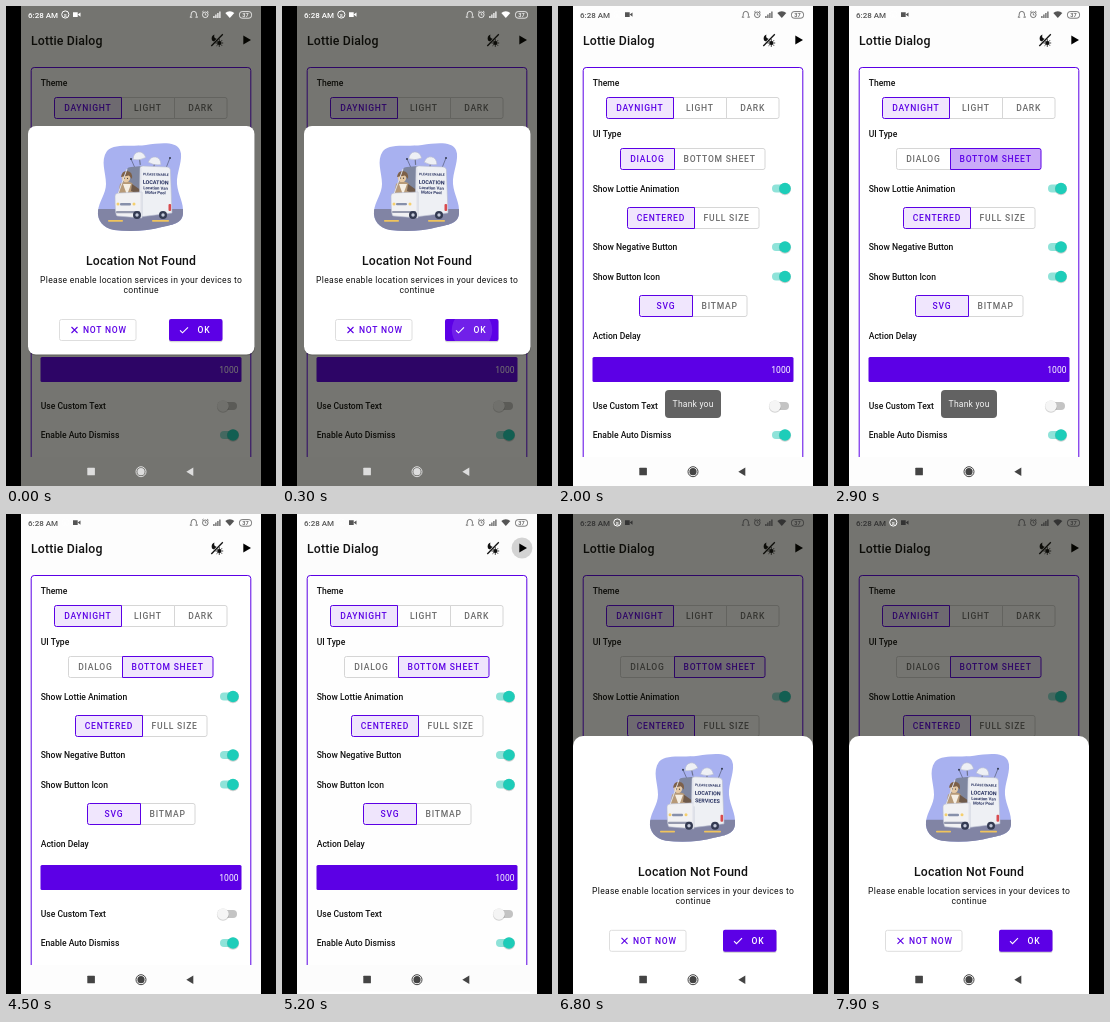
An HTML page with a canvas that plays this animation: 270x480 px, repeating every 8 s.

```html
<!DOCTYPE html>
<html lang="en">
<head>
<meta charset="utf-8">
<title>Lottie Dialog</title>
<style>
html, body { margin: 0; width: 100%; height: 100%; overflow: hidden; background: #000; }
canvas { display: block; width: 270px; height: 480px; }
</style>
</head>
<body>
<canvas id="stage"></canvas>
<script>
const LOOP = 8000;
const PURPLE = '#5c00e6', TINT = '#f0e6fd', TEAL = '#1dcdb9';
const canvas = document.getElementById('stage');
const g = canvas.getContext('2d');
const ratio = window.devicePixelRatio || 1;
canvas.width = 270 * ratio;
canvas.height = 480 * ratio;

const ramp = (t, a, b) => Math.min(1, Math.max(0, (t - a) / (b - a)));
const easeOut = p => 1 - (1 - p) ** 3;
// Rises from a to b, holds, falls from c to d.
const pulse = (t, a, b, c, d) => ramp(t, a, b) * (1 - ramp(t, c, d));

function paint(fill, stroke, line) {
  if (fill) { g.fillStyle = fill; g.fill(); }
  if (stroke) { g.strokeStyle = stroke; g.lineWidth = line; g.stroke(); }
}

function box(x, y, w, h, r, fill, stroke, line = 1) {
  g.beginPath();
  g.roundRect(x, y, w, h, r);
  paint(fill, stroke, line);
}

function disc(x, y, r, fill, stroke, line = 1) {
  g.beginPath();
  g.arc(x, y, r, 0, 7);
  paint(fill, stroke, line);
}

function shape(path, fill, stroke, line = 1) {
  const p = new Path2D(path);
  if (fill) { g.fillStyle = fill; g.fill(p); }
  if (stroke) { g.strokeStyle = stroke; g.lineWidth = line; g.stroke(p); }
}

function text(str, x, y, { size = 8.56, weight = 500, color = '#111', align = 'left', spacing = 0 } = {}) {
  g.font = `${weight} ${size}px Roboto, sans-serif`;
  g.letterSpacing = spacing + 'px';
  g.textAlign = align;
  g.fillStyle = color;
  g.fillText(str, x + (align === 'center' ? spacing / 2 : 0), y);
}

function faded(alpha, draw) {
  if (alpha <= 0) return;
  g.save();
  g.globalAlpha *= alpha;
  draw();
  g.restore();
}

function clipped(x, y, w, h, r, draw) {
  g.save();
  g.beginPath();
  g.roundRect(x, y, w, h, r);
  g.clip();
  draw();
  g.restore();
}

// edges lists the left side of each button plus the right end of the group.
function group(y, edges, labels, selected) {
  const cell = i => {
    const on = i === selected, x = edges[i], w = edges[i + 1] - x;
    const first = i === 0, last = i === labels.length - 1;
    const r = [first ? 2 : 0, last ? 2 : 0, last ? 2 : 0, first ? 2 : 0];
    box(x + .5, y + .5, w, 21, r, on ? TINT : null, on ? PURPLE : '#d6d6d6');
    text(labels[i], x + w / 2, y + 14.2,
      { color: on ? PURPLE : '#6c6c6c', align: 'center', spacing: .76 });
  };
  labels.forEach((_, i) => i !== selected && cell(i));
  cell(selected);
}

function toggle(y, on) {
  box(214, y - 4, 17, 8, 4, on ? '#8fe3d9' : '#c4c4c4');
  const x = on ? 227 : 217;
  disc(x, y + .6, 6.1, 'rgba(0,0,0,.18)');
  disc(x, y, 5.8, on ? TEAL : '#f5f5f5');
}

function dayNightIcon() {
  shape('M205.3 40L216.8 28.2', null, '#111', 1.3);
  shape('M208.4 28.6Q204.6 30.4 206 34.4L208 35.4L210.6 32.8Q207.4 32.4 208.4 28.6Z', '#111');
  disc(213.3, 37, 1.9, '#111');
  for (let i = 0; i < 8; i++) {
    const a = i * Math.PI / 4;
    shape(`M213.3 37l${Math.cos(a) * 3.9} ${Math.sin(a) * 3.9}`, null, '#111', .8);
  }
}

function page(t) {
  box(15, 0, 240, 480, 0, '#fdfdfd');
  text('Lottie Dialog', 25, 38.6, { size: 12.3, spacing: .15 });
  dayNightIcon();
  faded(.16 * pulse(t, 5000, 5100, 5250, 5500), () =>
    disc(240, 34, 4 + 8 * ramp(t, 5000, 5250), '#000'));
  shape('M237.3 29.4L245 34L237.3 38.6Z', '#000');

  clipped(15, 50, 240, 401, 0, () => box(25.2, 61.5, 219.6, 420, 3, '#fff', PURPLE, 1));
  const labels = {
    80: 'Theme', 131: 'UI Type', 185.5: 'Show Lottie Animation', 244: 'Show Negative Button',
    273.5: 'Show Button Icon', 333: 'Action Delay', 403: 'Use Custom Text', 432.2: 'Enable Auto Dismiss'
  };
  for (const y in labels) text(labels[y], 34.7, +y);

  group(91, [48, 115, 168, 220.5], ['DAYNIGHT', 'LIGHT', 'DARK'], 0);
  group(142, [62, 116, 206.5], ['DIALOG', 'BOTTOM SHEET'], t < 2650 ? 0 : 1);
  faded(.26 * pulse(t, 2500, 2600, 3000, 3350), () =>
    clipped(116, 142, 91, 22, 2, () => disc(170, 153, 10 + 60 * easeOut(ramp(t, 2500, 2850)), PURPLE)));
  group(201, [69, 136, 200.5], ['CENTERED', 'FULL SIZE'], 0);
  group(289, [81, 134, 188.5], ['SVG', 'BITMAP'], 0);

  [182.5, 241, 270.5, 429].forEach(y => toggle(y, true));
  toggle(400, false);
  box(34.5, 351, 201, 25, 1.5, PURPLE);
  text('1000', 232.5, 366.5, { weight: 400, color: '#fff', align: 'right' });
}

function toast(t) {
  faded(pulse(t, 1600, 1800, 3450, 3700), () => {
    box(107, 384, 56, 28, 4, '#626262');
    text('Thank you', 135, 401, { weight: 400, color: '#f4f4f4', align: 'center', spacing: .2 });
  });
}

function statusBar(c) {
  text('6:28 AM', 22, 11.8, { size: 8, color: c });
  disc(59.3, 8.5, 3.6, null, '#fff', 1);
  text('s', 59.3, 10.6, { size: 6, color: '#fff', align: 'center' });
  shape('M67 6.3h4.7v4.6h-4.7zM71.7 8.5l2.8-2v4.2z', c);
  shape('M184.6 10.8Q185.4 9.5 185.2 8a2.6 2.6 0 0 1 5.2 0Q190.2 9.5 191 10.8M183.8 11.2h2.4M189.4 11.2h2.4', null, c, .8);
  disc(199.3, 8.8, 2.8, null, c, .8);
  shape('M199.3 7.2V9h1.2M196 6.3l1.6-1.3M202.6 6.3l-1.6-1.3', null, c, .7);
  for (let i = 0; i < 4; i++) box(207.3 + i * 2, 10 - i * 1.5, 1.2, 2 + i * 1.5, 0, c);
  shape('M219.3 7a6.4 6.4 0 0 1 9 0L223.8 12Z', c);
  box(233.5, 5.6, 12, 6.6, 2.6, null, c, .8);
  text('37', 239.5, 11, { size: 5.6, color: c, align: 'center' });
}

function navBar(c) {
  box(81.3, 461.7, 7.6, 7.6, .6, c);
  disc(135, 465.7, 5, null, c, 1);
  disc(135, 465.7, 3.6, c);
  shape('M187.3 461.4V470L180.3 465.7Z', c);
}

function dish(x, y, tilt) {
  g.save();
  g.translate(x, y);
  g.rotate(tilt);
  shape('M0 2V9', null, '#6d7390', 1.2);
  shape('M-6.5 2.5Q-5 -4 0 -4Q5 -4 6.5 2.5Q0 5 -6.5 2.5Z', '#eef0f5', '#b5bad0', .6);
  g.restore();
}

function driver() {
  shape('M112 189L114 178Q119 173 126 177L133 189Z', '#b79a78');
  shape('M117 178L121 189L125 178Z', '#f6efe4');
  shape('M126 178L136 185L134 189L125 185Z', '#6f5a4a');
  disc(120, 172, 4.2, '#e6c9a4');
  shape('M115 171Q116 164.5 121 165Q127 165.5 126 173L123 169.5Z', '#7d6048');
  disc(118.5, 172, .6, '#333');
  disc(121.5, 172.3, .6, '#333');
}

// The banner unrolls over the lettering on the van's side.
function vanSide(unrolled) {
  const ink = { size: 4.2, weight: 700, color: '#26305f', align: 'center' };
  g.save();
  g.translate(150, 165);
  g.rotate(.03);
  text('Location Van', 0, 18.5, ink);
  text('Motor Pool', 0, 23, ink);
  clipped(-14, -2, 28, 27 * unrolled, 0, () => {
    box(-14, -2, 28, 27, 0, '#eef0f4');
    text('PLEASE ENABLE', 0, 4.6, { ...ink, size: 3.4 });
    text('LOCATION', 0, 13.2, { ...ink, size: 5.4 });
    text('SERVICES', 0, 20.8, { ...ink, size: 5.4 });
  });
  g.restore();
}

function illustration(t) {
  const blob = 'M101 145C108 137 124 141 140 139C154 137 170 135 174 144C178 153 170 167 171 178' +
    'C172 189 178 196 177 208C176 218 165 219 156 221C142 225 124 226 108 224C97 222 91 214 92 205' +
    'C93 195 100 188 100 178C100 166 94 155 101 145Z';
  shape(blob, '#a8b1f0');
  g.save();
  g.clip(new Path2D(blob));
  box(90, 203, 90, 25, 0, '#8184a4');
  box(102, 214, 15, 1.8, .8, '#f0c45c');
  box(146, 214, 17, 1.8, .8, '#f0c45c');
  g.restore();

  g.save();
  g.translate(0, .4 * Math.sin(t / 90));
  shape('M125 153L129 162M164 152L160 162', null, '#555c78', .7);
  disc(125, 153, 1, '#333a51');
  disc(164, 152, 1, '#333a51');
  dish(133, 150, -.15 + .1 * Math.sin(t / 300));
  dish(149, 155, .1 + .1 * Math.sin(t / 300 + 1));
  shape('M114 183L121 163Q122 161 125 161L136 160V190H112Z', '#7e869f');
  driver();
  shape('M134 162Q134 160 137 160L161 161Q164 161 164.4 164L166 207L133 211Z', '#eef0f4', '#b7bccf', .6);
  shape('M109 190Q109 187 113 187L136 186V212L111 210Q109 209 109 190Z', '#f1f1f3', '#b7bccf', .6);
  shape('M112 188L121 163M135 162V211', null, '#dfe1ea', 1);
  box(110, 205, 24, 2.2, 1, '#9599ad');
  box(114, 197, 11, 2.4, 1, '#8790aa');
  disc(112, 198, 1.5, '#f5cf6d');
  disc(128, 198, 1.5, '#f5cf6d');
  box(162.5, 198, 2.6, 7, 1, '#d94b4f');
  vanSide(t < 1000 ? .58 : 1 - .42 * ramp(t, 7400, 7900));
  g.restore();
  for (const x of [131, 157]) {
    disc(x, 209, 4, '#333a51');
    disc(x, 209, 1.7, '#c3c8d8');
  }
}

// Shared content of dialog and sheet; spread moves the two buttons apart.
function message(t, spread, press) {
  illustration(t);
  text('Location Not Found', 135, 259.3, { size: 12.22, align: 'center', spacing: .15 });
  const body = { weight: 400, align: 'center', spacing: .29 };
  text('Please enable location services in your devices to', 135, 277, body);
  text('continue', 135, 287, body);

  const no = 53.5 - spread, ok = 163 + spread;
  const label = { color: PURPLE, spacing: .76 };
  box(no, 313.5, 76.5, 21, 2, '#fff', '#dedede');
  shape(`M${no + 12} 321l6 6m0 -6l-6 6`, null, PURPLE, 1.1);
  text('NOT NOW', no + 23.5, 327.2, label);
  box(ok, 314.2, 53.5, 22, 2, 'rgba(0,0,0,.16)');
  box(ok, 313, 53.5, 22, 2, PURPLE);
  faded(.25 * press, () => clipped(ok, 313, 53.5, 22, 2, () => disc(ok + 27, 324, 40 * press, '#fff')));
  shape(`M${ok + 11} 324.3l2.5 2.5l5.5 -5.5`, null, '#fff', 1.1);
  text('OK', ok + 28.5, 327.2, { ...label, color: '#fff' });
}

function draw(t) {
  g.setTransform(ratio, 0, 0, ratio, 0, 0);
  box(0, 0, 270, 480, 0, '#000');

  const dialog = 1 - ramp(t, 480, 680);
  const sheet = easeOut(ramp(t, 5200, 5500));
  const dim = Math.max(dialog, ramp(t, 5200, 5400));

  clipped(15, 0, 240, 480, 0, () => {
    page(t);
    faded(.56 * dim, () => box(15, 0, 240, 480, 0, '#0a0a02'));
    toast(t);
    faded(dialog, () => {
      box(22, 121, 227, 228.5, 8, 'rgba(0,0,0,.2)');
      box(22, 120, 226.5, 228.5, 8, '#fff');
      message(t, 0, pulse(t, 200, 400, 480, 680));
    });
    if (sheet > 0) {
      g.save();
      g.translate(0, 258 * (1 - sheet));
      box(15, 222, 240, 270, [10, 10, 0, 0], '#fff');
      g.translate(0, 102.8);
      message(t, 2, 0);
      g.restore();
    }
    statusBar(dialog > .5 ? '#fff' : dim > .5 ? '#333' : '#555');
    navBar(dialog > .5 ? '#ddd' : '#444');
  });
}

function tick() {
  draw(performance.now() % LOOP);
  requestAnimationFrame(tick);
}
tick();
</script>
</body>
</html>
```
